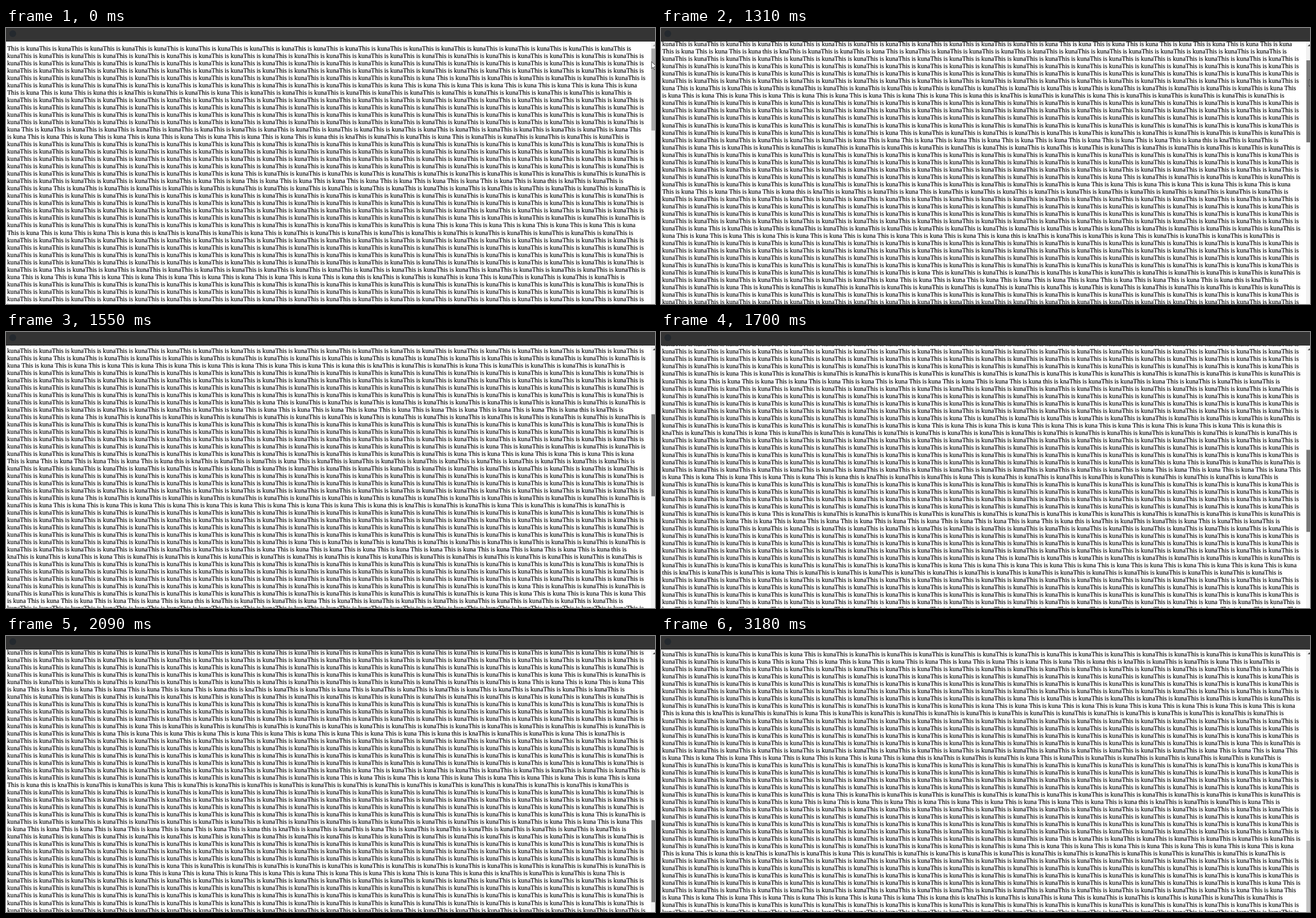
Animation of 1148 by 488 pixels, one loop 3.76 s. Source, as an HTML page:

```html
<!DOCTYPE html>
<html lang="en">
<head>
<meta charset="utf-8">
<title>Scrolling text</title>
<style>
  html, body { margin: 0; width: 100%; height: 100%; overflow: hidden; background: #fff; }
  svg { display: block; }
  text {
    font: 11.64px "Liberation Serif", "Times New Roman", serif;
    font-kerning: none;
    word-spacing: -.19px;
    text-rendering: geometricPrecision;
    fill: #000;
    stroke: #000;
    stroke-width: .15px;
  }
</style>
</head>
<body>
<svg width="1148" height="488" viewBox="0 0 1148 488">
  <rect width="1148" height="488" fill="#fff"/>
  <g id="page"></g>
  <rect x="1141" y="24" width="7" height="464" fill="#f1f1f1"/>
  <path id="arrow" d="M1143.8 32.2L1147 29L1150.2 32.2Z"/>
  <rect id="thumb" x="1141.6" width="10" height="145"/>
  <rect width="1148" height="24" fill="#343434"/>
  <rect y="23" width="1148" height="1" fill="#303030"/>
  <circle cx="12" cy="10" r="6" fill="#24292e"/>
  <path id="cursor" d="M0 0V12.2L2.8 9.6L4.8 14L6.7 13.2L4.8 8.9H8.6Z"
        fill="#fff" stroke="#000" stroke-width=".75"/>
</svg>
<script>
const LOOP = 3760, LINE = 13.02, BASE = 40, RATIO = 3.49, VIEW = 488;
const GRAB = 1310, RELEASE = 2640, LEAVE = 2860;
const $ = id => document.getElementById(id);

// Serif advances in thousandths of an em; other letters are half an em
const ADV = { T: 611, i: 278, t: 278, s: 389, a: 444, ' ': 250 };
const MAX = 97950;
const width = s => [...s].reduce((w, c) => w + (ADV[c] || 500), 0);

const unit = 'This is kuna';
const block = unit.repeat(93) + ' ' + unit.repeat(19) + (' ' + unit).repeat(10) +
  ' this is kna' + unit.repeat(3) + ' ';

function wrap(words) {
  const lines = [];
  let line = '';
  for (const word of words) {
    const next = line ? line + ' ' + word : word;
    if (width(next) > MAX) {
      lines.push(line);
      line = word;
    } else line = next;
  }
  return lines;
}

const rows = wrap(block.repeat(24).trim().split(' ')).slice(0, 130).map((s, i) => {
  const row = document.createElementNS('http://www.w3.org/2000/svg', 'text');
  row.setAttribute('x', 2);
  row.setAttribute('y', (BASE + i * LINE).toFixed(2));
  row.textContent = s;
  return $('page').appendChild(row);
});

// Time and scroll offset at the turns of the drag
const DRAG = [[GRAB, 72.8], [1550, 381], [1840, 820], [2090, 1009.7], [2240, 1136.4]];

// Each stretch of the drag moves in even steps of about 75 ms
function scrollAt(t) {
  if (t < GRAB) return 0;
  const i = DRAG.findIndex(d => d[0] > t);
  if (i < 0) return DRAG[DRAG.length - 1][1];
  const [t0, s0] = DRAG[i - 1], [t1, s1] = DRAG[i];
  const n = Math.round((t1 - t0) / 75);
  return s0 + (s1 - s0) * Math.floor(n * (t - t0) / (t1 - t0)) / n;
}

// The pointer drifts off the right edge, holds the thumb, then leaves at the bottom
function pointerAt(t, scroll) {
  if (t < 680) return [1142, 59.5];
  if (t < 780) return [1145, 59.5];
  if (t >= GRAB && t < RELEASE) return [1147 + (scroll - 72.8) / 20, 70 + scroll / RATIO];
  if (t >= LEAVE) {
    const k = Math.floor((t - LEAVE) / 85);
    return [1143 - 7 * k, 440 + 23.5 * k];
  }
  return [1160, 70];
}

function toneAt(t) {
  if (t >= GRAB && t < RELEASE) return '#787878';
  return t < LEAVE + 85 ? '#a8a8a8' : '#c1c1c1';
}

let shown = -1;
function scrollTo(y) {
  if (y === shown) return;
  shown = y;
  $('page').setAttribute('transform', `translate(0 ${-y})`);
  rows.forEach((row, i) => {
    const at = BASE + i * LINE - y;
    row.style.display = at > 12 && at < VIEW + 14 ? '' : 'none';
  });
  $('thumb').setAttribute('y', 36.3 + y / RATIO);
  $('arrow').setAttribute('fill', y ? '#505050' : '#a3a3a3');
}

function draw(t) {
  const y = scrollAt(t);
  scrollTo(y);
  $('thumb').setAttribute('fill', toneAt(t));
  $('cursor').setAttribute('transform', `translate(${pointerAt(t, y)})`);
}

const start = performance.now();
function tick() {
  draw((performance.now() - start) % LOOP);
  requestAnimationFrame(tick);
}
tick();
</script>
</body>
</html>
```
